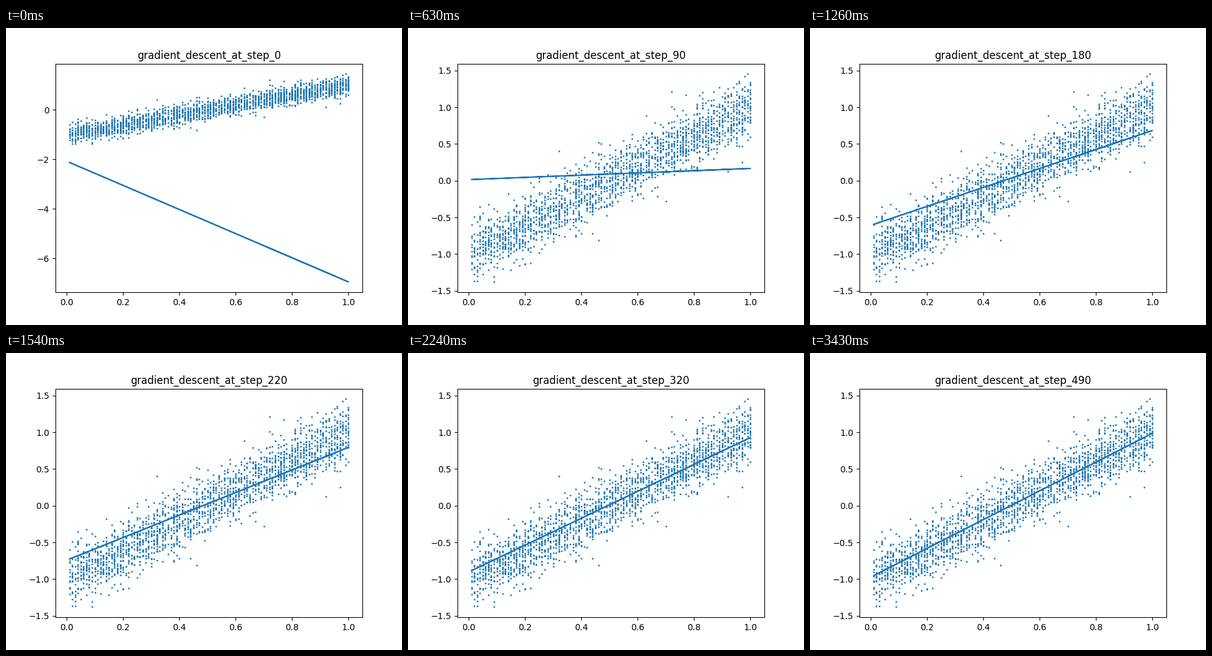
Animation, 640 px wide and 480 px high, one loop 3500 ms. Source, as a matplotlib script:

```python
import numpy as np
import matplotlib.pyplot as plt
from matplotlib.animation import FuncAnimation

FRAMES, INTERVAL, STEPS_PER_FRAME = 50, 70, 10
POINTS, SPREAD = 2000, 0.2
Y_MIN, Y_MAX = -1.379, 1.452

plt.rcParams["text.kerning_factor"] = 6

# A few stray points, among them the two that set the vertical limits
STRAYS = [(0.09, Y_MIN), (0.99, Y_MAX), (0.72, 1.21), (0.32, 0.40),
          (0.63, 0.88), (0.92, 0.12), (0.70, -0.28)]


def make_data():
    """Noisy samples of y = 2x - 1 on a grid of hundredths."""
    rng = np.random.default_rng(7)
    x = rng.integers(1, 101, POINTS) / 100
    y = 2 * x - 1 + rng.normal(0, SPREAD, POINTS)
    inside = (y > Y_MIN) & (y < Y_MAX)
    stray_x, stray_y = np.transpose(STRAYS)
    return (np.append(x[inside], stray_x), np.append(y[inside], stray_y))


# The error in (slope, intercept) decays along a slow and a fast axis.
BEST_FIT = np.array([1.984, -0.987])
SLOW_AXIS = np.array([0.880, -0.481])
FAST_AXIS = np.array([0.475, 0.880])


def weights(step):
    slow = -5.512 * np.exp(-0.01082 * step)
    fast = -4.25 * 0.7806 ** step
    return BEST_FIT + slow * SLOW_AXIS + fast * FAST_AXIS


x, y = make_data()
fig, ax = plt.subplots(figsize=(6.4, 4.8), dpi=100)


def draw(frame):
    step = frame * STEPS_PER_FRAME
    slope, intercept = weights(step)
    ax.clear()
    ax.scatter(x, y, s=1)
    ax.plot(x, slope * x + intercept)
    ax.set_title(f"gradient_descent_at_step_{step}")


anim = FuncAnimation(fig, draw, frames=FRAMES, init_func=lambda: draw(0),
                     interval=INTERVAL, repeat=True, repeat_delay=0)
plt.show()
```
